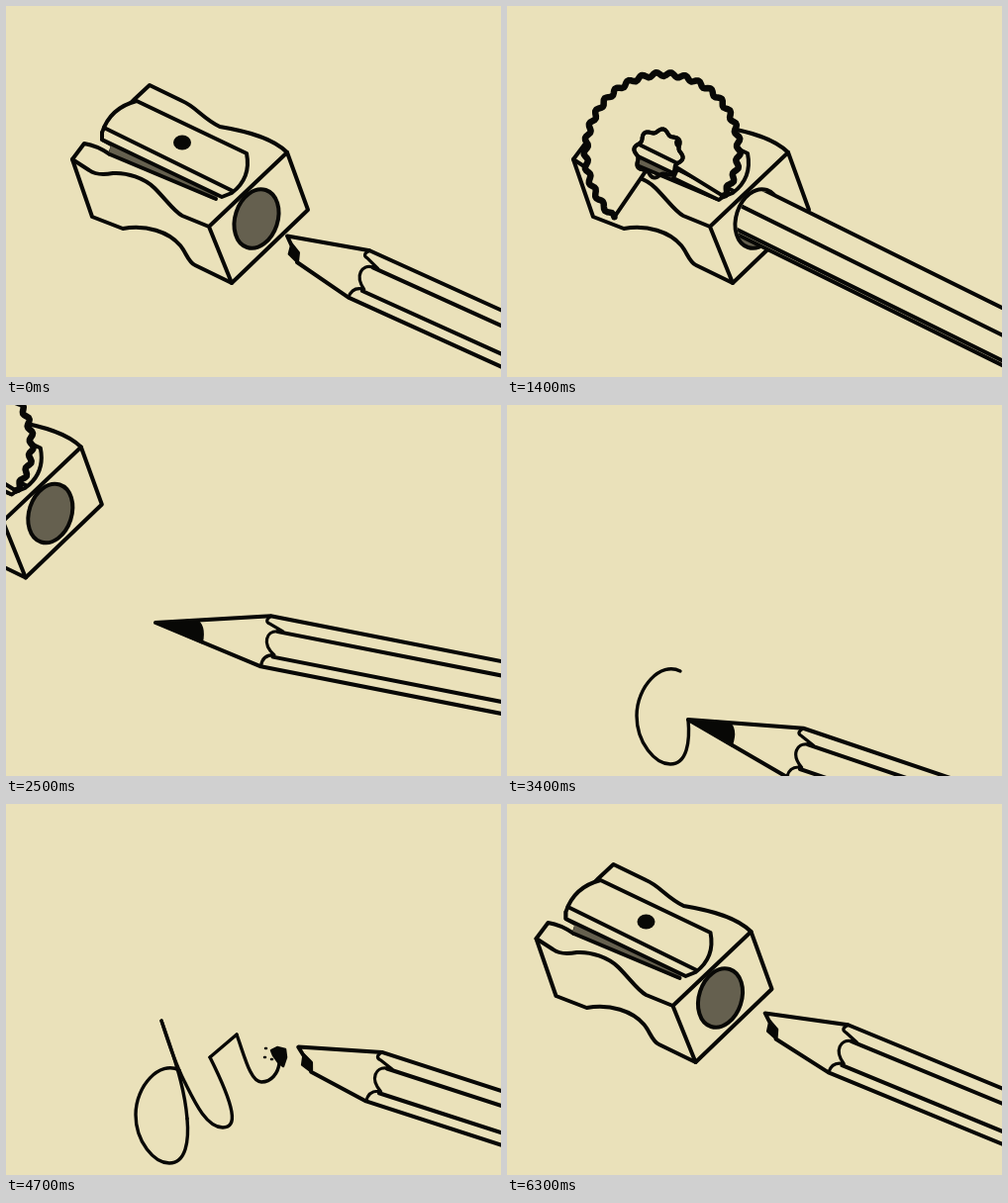
An HTML page with a canvas that plays this animation: 500x375 px, repeating every 6400 ms.

```html
<!DOCTYPE html>
<html lang="en">
<head>
<meta charset="utf-8">
<title>Pencil and sharpener</title>
<style>
  html, body { margin: 0; width: 100%; height: 100%; overflow: hidden; background: #eae1ba; }
  canvas { display: block; }
</style>
</head>
<body>
<canvas id="stage" width="500" height="375"></canvas>
<script>
const ctx = document.getElementById('stage').getContext('2d');
const PAPER = '#eae1ba', INK = '#080806', SHADE = '#65604f';
const LOOP = 6400, STEP = 100, RAD = Math.PI / 180;
const WRITE = 2800, SNAP = 4600;

// Pencil poses: sharp point x, y and angle
const START = [252.5, 227, 24.4], INSERTED = [120, 149.5, 26.3], READY = [151, 220, 11.1],
  TOUCHING = [175, 269, 17], LIFTED = [238, 207, 16.5], WAITING = [229, 207, 22.4];

const body = new Path2D(`M67 155L87 213L118 225C142 221 164 228 176 242C182 249 184 259 191 262
  L228 280L305 206L284 148C270 134 246 127 216 122C198 113 192 102 178 96L145 80L130 94
  L97 128V135L108 141L105 150Q92 141 79 139Z`);
const bodyEdges = new Path2D(`M67 155L84 166Q92 172 108 169C122 168 140 174 150 184C162 196 170 208 178 212
  L205 223L228 280M205 223L284 148M105 150L212 195`);
const gap = new Path2D('M106 140L116 142L220 189L210 196L104 149Z');
const blade = new Path2D('M97 128Q105 103 132 96L243 149Q248 174 228 189L218 193L97 135Z');
const bevel = new Path2D('M99 123L229 187');
const slip = new Path2D('M172 165L222 190L214 196L168 174Z');
const sharpWood = new Path2D('M0 0L113 -29H640V23H113Z');
const sharpLead = new Path2D('M0 0L39 -10.5Q50 -8 50 11Z');
const brokenWood = new Path2D('M31 -8L113 -29H640V23H113L51 12L48 3L38 -2Z');
const brokenLead = new Path2D('M38 -3L48 3L51 12L40 8Z');
const scallop = new Path2D('M113 -29Q107 -22 114 -21L128 -16M122 -15C112 -13 109 0 124 9Q112 11 113 23');
const crumbs = new Path2D('M268 249L274 246L282 248L283 256L280 265L275 261L270 254ZM262 247h1M261 256h1M268 258h1');

const strokes = [
  [2800, 3400, 'M175 269C155 259 131 285 131 314C131 342 150 363 165 363C182 363 185 340 183 318'],
  [3400, 3700, 'M183 318C181 295 176 272 157 219'],
  [3700, 4100, 'M157 219C166 248 174 268 180 280C190 300 202 327 219 327C234 327 232 308 206 256'],
  [4100, 4200, 'M206 256L233 233'],
  [4200, SNAP, 'M233 233C241 255 247 281 258 281C268 281 275 272 276 262']
].map(([start, end, d]) => {
  const curve = document.createElementNS('http://www.w3.org/2000/svg', 'path');
  curve.setAttribute('d', d);
  return { start, end, curve, length: curve.getTotalLength(), path: new Path2D(d) };
});

const ramp = (t, start, end) => Math.max(0, Math.min(1, (t - start) / (end - start)));
const mix = (a, b, f) => a.map((v, i) => v + (b[i] - v) * f);

function sharpenerOffset(t) {
  const d = t < 4000 ? Math.max(0, (t - 1600) / 1200) ** 1.27 : (LOOP - t) / 800;
  return [-300 * d, -152 * d];
}

function panOffset(t) {
  const d = Math.max(0, (t - 5000) / 300) ** 1.5;
  return [37 * d, 52 * d];
}

function pencilPose(t, tip) {
  if (t < WRITE) {
    const pose = mix(mix(START, INSERTED, ramp(t, 0, 300)), READY, ramp(t, 2000, 2500));
    return mix(pose, TOUCHING, ramp(t, 2500, WRITE));
  }
  const lifted = mix([...tip, 18.7], LIFTED, ramp(t, SNAP, 4900));
  return mix(lifted, WAITING, ramp(t, 5300, 5600));
}

function draw(path, fill, width = 4) {
  if (fill) { ctx.fillStyle = fill; ctx.fill(path); }
  if (width) { ctx.lineWidth = width; ctx.stroke(path); }
}

function ellipse(x, y, rx, ry, tilt = 0) {
  const path = new Path2D();
  path.ellipse(x, y, rx, ry, tilt * RAD, 0, 7);
  return path;
}

function polyline(points) {
  const path = new Path2D();
  points.forEach(p => path.lineTo(...p));
  return path;
}

// Wavy arc whose radius widens by flare towards its end
function wavyArc(x, y, r, bumps, from, to, flare = 0) {
  const points = [], n = Math.ceil(Math.abs(to - from) / 1.5) + 1;
  for (let i = 0; i <= n; i++) {
    const a = (from + (to - from) * i / n) * RAD;
    const d = r + 2 * Math.sin(a * bumps) + flare * (i / n) ** 6;
    points.push([x + d * Math.cos(a), y + d * Math.sin(a)]);
  }
  return points;
}

function drawShaving(grown) {
  const start = 38, end = start - 272 * grown;
  const outer = wavyArc(158, 145, 76, 33, start, end, 9 * grown);
  const inner = wavyArc(153, 149, 23, 8, end, start);
  const fan = polyline([...outer, ...inner]);
  fan.closePath();
  draw(slip, PAPER);
  draw(fan, PAPER);
  draw(polyline(outer), null, 6.5);
  draw(polyline(wavyArc(153, 149, 23, 8, start, start - 360 * grown)));
}

function drawSharpener(t) {
  draw(body, PAPER);
  draw(gap, SHADE, 0);
  draw(bodyEdges);
  draw(blade, PAPER);
  draw(bevel);
  draw(ellipse(178, 138, 9, 7.5), INK, 0);
  draw(ellipse(253, 215, 21.5, 30.5, 18), SHADE);
  const grown = ramp(t, 200, 1100);
  if (grown > 0 && t < WRITE) drawShaving(grown);
}

// Everything in front of the hole, plus the hole itself
function clipAtHole() {
  const path = ellipse(253, 215, 19.5, 28.5, 18);
  path.addPath(polyline([[438, -355], [1500, -355], [1500, 785], [68, 785]]));
  ctx.clip(path);
}

function drawPencil(t, [x, y, angle]) {
  const sharp = t > 700 && t < SNAP;
  const roll = Math.max(0, Math.min(300, (t - 200) * 0.22));
  ctx.translate(x, y);
  ctx.rotate(angle * RAD);
  draw(sharp ? sharpWood : brokenWood, PAPER);
  draw(sharp ? sharpLead : brokenLead, INK, 2);
  for (let a = -87 + roll % 60; a < 75; a += 60) {
    const v = -3 + 26 * Math.sin(a * RAD);
    if (a > -60) draw(polyline([[123, v], [640, v]]));
  }
  draw(scallop, null, 3.2);
}

// Draws the writing so far and returns where it ends
function drawWriting(t) {
  let tip;
  for (const { start, end, curve, length, path } of strokes) {
    if (t < start) break;
    const drawn = length * ramp(t, start, end), p = curve.getPointAtLength(drawn);
    ctx.setLineDash([drawn, 2 * length]);
    draw(path, null, 3.4);
    tip = [p.x, p.y];
  }
  ctx.setLineDash([]);
  if (t >= SNAP) draw(crumbs, INK, 2.5);
  return tip;
}

function at([x, y], paint) {
  ctx.save();
  ctx.translate(x, y);
  paint();
  ctx.restore();
}

function render(t) {
  ctx.fillStyle = PAPER;
  ctx.fillRect(0, 0, 500, 375);
  ctx.strokeStyle = INK;
  ctx.lineCap = ctx.lineJoin = 'round';

  let tip;
  const [x, y] = sharpenerOffset(t);
  if (t >= WRITE) at(panOffset(t), () => { tip = drawWriting(t); });
  at([x, y], () => {
    drawSharpener(t);
    clipAtHole();
    ctx.translate(-x, -y);
    drawPencil(t, pencilPose(t, tip));
  });
}

const began = performance.now();
function tick() {
  const t = (performance.now() - began) % LOOP;
  render(Math.floor(t / STEP) * STEP);
  requestAnimationFrame(tick);
}
tick();
</script>
</body>
</html>
```
